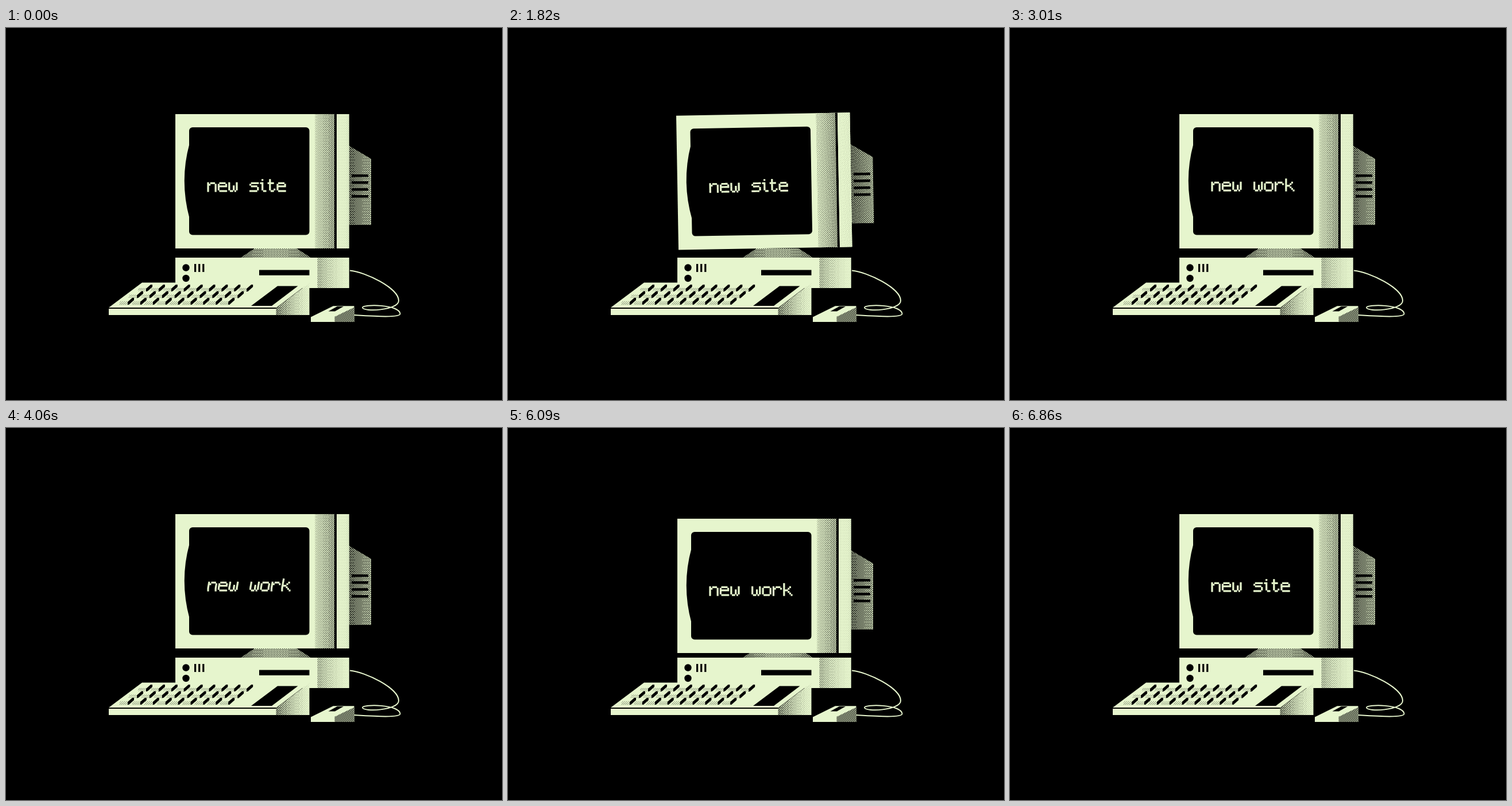
Animation of 864 by 648 pixels, one loop 7.7 s. Source, as an HTML page with a canvas:

```html
<!DOCTYPE html>
<html lang="en">
<head>
<meta charset="utf-8">
<title>Old computer</title>
<style>
html, body { margin: 0; width: 100%; height: 100%; overflow: hidden; background: #000; }
canvas { display: block; }
</style>
</head>
<body>
<canvas id="stage" width="864" height="648" role="img" aria-label="An old computer showing: new site, new work"></canvas>
<script>
const ctx = document.getElementById('stage').getContext('2d');
const LIGHT = '#e6f5cd', DARK = '#000';
const LOOP = 7700, STEP = 70;

// Pixel letters, eight rows each
const GLYPHS = {
  n: '....../....../#.###./##...#/#....#/#....#/#....#/#....#',
  e: '....../....../.####./#....#/######/#...../#...../.#####',
  w: '....../....../#....#/#....#/#..#.#/#..#.#/#..#.#/.##.#.',
  s: '....../....../.#####/#...../.####./.....#/.....#/#####.',
  i: '.#../..../##../.#../.#../.#../.#../..##',
  t: '.#.../.#.../####./.#.../.#.../.#.../.#..#/..##.',
  o: '....../....../.####./#....#/#....#/#....#/#....#/.####.',
  r: '....../....../#.###./##...#/#...../#...../#...../#.....',
  k: '#...../#...../#...#./#..#../###.../#..#../#...#./#....#',
  ' ': '......'
};

// Poses of one knock, one entry per step
const TILT = [-1, -2.5, -1, 0, 0, 0, 0, 0, 0, 0, 0];
const DROP = [0, 0, 0, 8, 8, 8, 8, 8, 5, 2, 0];
const MOUSE = [0, 0, 0, 0, 3, 5, 5, 3, 1.5, 0, 0];

function rect(x1, y1, x2, y2, color = LIGHT) {
  ctx.fillStyle = color;
  ctx.fillRect(x1, y1, x2 - x1, y2 - y1);
}

function poly(points, color = LIGHT) {
  ctx.beginPath();
  points.forEach(([x, y]) => ctx.lineTo(x, y));
  ctx.closePath();
  ctx.fillStyle = color;
  ctx.fill();
}

function box(x1, y1, x2, y2) {
  return [[x1, y1], [x2, y1], [x2, y2], [x1, y2]];
}

function clamp(u) {
  return Math.min(1, Math.max(0, u));
}

// Checkered shade; light(u, x, y) is the share of light, u runs 0 to 1 from left to right
function shade(points, light) {
  const pitch = 10 / 3;
  const xs = points.map(p => p[0]), ys = points.map(p => p[1]);
  const left = Math.min(...xs), right = Math.max(...xs);
  const top = Math.min(...ys), bottom = Math.max(...ys);
  ctx.save();
  poly(points);
  ctx.clip();
  ctx.beginPath();
  for (let j = Math.floor(top * 2 / pitch); j * pitch / 2 <= bottom + pitch; j++) {
    for (let i = Math.floor(left / pitch) - 1; i * pitch <= right + pitch; i++) {
      const x = (i + j % 2 / 2) * pitch, y = j * pitch / 2;
      const size = pitch * (1 - light(clamp((x - left) / (right - left)), x, y));
      ctx.rect(x - size / 2, y - size / 2, size, size);
    }
  }
  ctx.fillStyle = DARK;
  ctx.fill();
  ctx.restore();
}

function turned(degrees, x, y, draw) {
  ctx.save();
  ctx.translate(x, y);
  ctx.rotate(degrees * Math.PI / 180);
  ctx.translate(-x, -y);
  draw();
  ctx.restore();
}

function write(word, y, slanted, rows) {
  const w = 2.63, h = 2.75;
  let x = 350.4;
  ctx.fillStyle = LIGHT;
  for (const letter of word) {
    const lines = GLYPHS[letter].split('/');
    lines.slice(0, rows).forEach((line, r) => {
      const lean = slanted ? Math.max(0, 5.5 - r) * 0.5 : 0;
      [...line].forEach((c, i) => {
        if (c === '#') ctx.fillRect(x + i * w + lean, y + r * h, w + 0.6, h + 0.4);
      });
    });
    x += (lines[0].length + 1) * w;
  }
}

function drawText(t) {
  const slanted = (t >= 630 && t < 910) || (t >= 4060 && t < 4340);
  if (t < 2520 || t >= 6860) write('new site', 263.2, slanted, 8);
  else if (t >= 2870 && t < 6580) write('new work', 262.2, slanted, t < 3010 ? 5 : 8);
}

function drawSheen(step) {
  const x = 305 + 45 * step, lean = 18, w = 36;
  const band = (left, top, bottom, dim, bright) => shade(
    [[left + lean, top], [left + lean + w, top], [left + w, bottom], [left, bottom]],
    (u, px, py) => {
      const edge = left + lean * (bottom - py) / (bottom - top);
      return dim + (bright - dim) * clamp((px - edge) / w);
    });
  band(x, 173, 267, 0.42, 0.7);
  band(x - 2 * lean - 2, 267, 361, 0.2, 0.52);
}

function drawMonitor(t) {
  shade([[597, 205], [636, 228], [636, 343], [597, 343]], u => 0.44 + 0.14 * u);
  for (let i = 0; i < 4; i++) rect(602, 255 + 12 * i, 631, 259.5 + 12 * i, DARK);

  rect(295, 150, 597.5, 384);
  shade(box(538.5, 150, 572, 384), u => 0.75 - 0.18 * u);
  rect(572, 150, 576, 384, DARK);
  shade(box(576, 150, 597.5, 384), u => 0.92 - 0.06 * u);

  const glass = new Path2D();
  glass.roundRect(319, 173, 209.5, 187.5, 6);
  glass.moveTo(322, 202);
  glass.lineTo(322, 331);
  glass.lineTo(319.5, 331);
  glass.quadraticCurveTo(302, 266, 319.5, 202);
  ctx.fillStyle = DARK;
  ctx.fill(glass);

  const sheen = Math.floor((t - (t < 3000 ? 840 : 5320)) / STEP);
  if (sheen >= 0 && sheen < 6) {
    ctx.save();
    ctx.clip(glass);
    drawSheen(sheen);
    ctx.restore();
  }
  drawText(t);
}

function drawBase() {
  rect(295, 400, 597.5, 453);
  shade(box(542.5, 400, 597.5, 453), u => 0.63 + 0.3 * u);
  for (const y of [417.5, 436]) {
    ctx.beginPath();
    ctx.arc(313.5, y, 6.2, 0, 7);
    ctx.fillStyle = DARK;
    ctx.fill();
  }
  for (let i = 0; i < 3; i++) rect(328 + 7.1 * i, 411, 331.2 + 7.1 * i, 425, DARK);
  rect(441, 421.5, 528.5, 430.8, DARK);
}

function drawKey(x, y) {
  poly([[x - 12, y + 6], [x - 4, y], [x + 8, y], [x, y + 6]]);
  shade([[x - 13, y + 6], [x, y + 6], [x, y + 12], [x - 15, y + 12]], () => 0.74);
  poly([[x, y + 7], [x + 8, y], [x + 11, y], [x + 11, y + 4], [x + 2, y + 12], [x, y + 12]], DARK);
}

function drawKeyboard(step) {
  poly([[237, 443.5], [528.5, 443.5], [471, 487], [179, 487]]);
  rect(179, 487, 471, 489, DARK);
  rect(179, 489, 471, 500);
  shade([[528.5, 444], [528.5, 500], [470.5, 500], [470.5, 488]], u => 0.5 + 0.4 * u);
  poly([[473, 449.5], [508.5, 449.5], [463, 484], [427, 484]], DARK);

  // Only the back row rattles, every third key together
  [244, 228, 212].forEach((left, row) => {
    for (let i = 0; i < 9; i++) {
      const hop = row || step > 9 ? 0 : 4 * Math.max(0, 1 - Math.abs(step - 7 + i % 3) / 2);
      drawKey(left + 21.9 * i, 447 + 11.5 * row - hop);
    }
  });
}

function drawMouse() {
  poly([[570, 484.3], [606.5, 484.3], [606.5, 512], [531, 512], [531, 503.5]]);
  shade([[572.5, 503], [606.5, 486.5], [606.5, 512], [572.5, 512]], () => 0.5);
  poly([[577, 485], [588, 485], [573, 493.5], [561.5, 493.5]], DARK);
}

function drawCable() {
  ctx.strokeStyle = LIGHT;
  ctx.lineWidth = 2;
  ctx.stroke(new Path2D('M599 422.5C626 425 684 453 684 475C684 492 622 495 621 487' +
    'C621 481 686 481 686.5 498C686 505 640 502 606 500'));
}

function draw(t) {
  rect(0, 0, 864, 648, DARK);
  const since = Math.floor((t - (t < 4000 ? 1820 : 5880)) / STEP);
  const step = since >= 0 && since < 10 ? since : 10;

  shade([[433, 384], [506, 384], [531, 400], [409, 400]], u => 0.45 + 0.15 * Math.sin(u * Math.PI));
  ctx.save();
  ctx.translate(0, DROP[step]);
  turned(TILT[step], 446, 267, () => drawMonitor(t));
  ctx.restore();
  drawBase();
  drawKeyboard(step);
  drawCable();
  turned(MOUSE[step], 606, 512, drawMouse);
}

let shown = -1;
function tick() {
  const t = Math.floor(performance.now() % LOOP / STEP) * STEP;
  if (t !== shown) draw(shown = t);
  requestAnimationFrame(tick);
}
tick();
</script>
</body>
</html>
```
